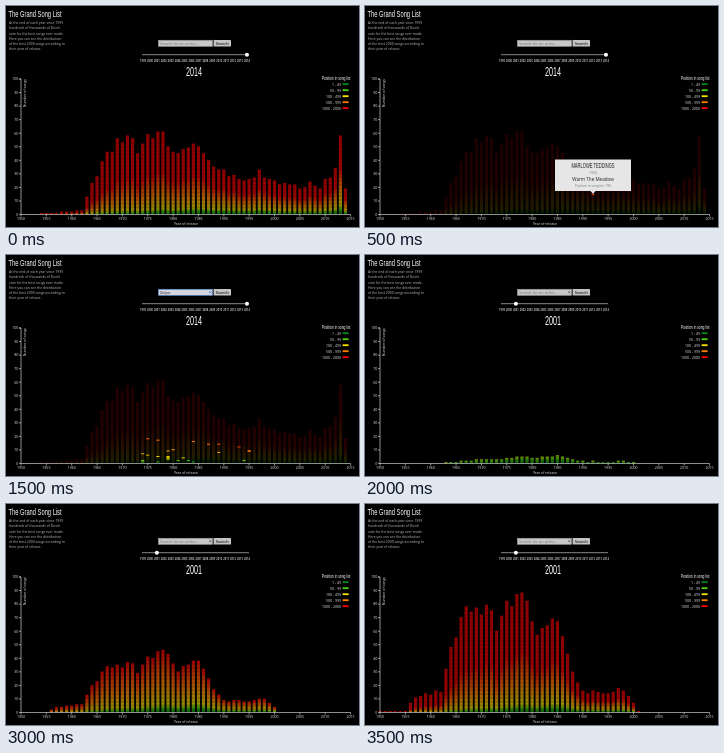
These frames come from a looping animation (353x221 px, 4000 ms). An HTML page with a canvas:

```html
<!DOCTYPE html>
<html lang="en">
<head>
<meta charset="utf-8">
<title>Songs by year of release</title>
<style>
  html, body { margin: 0; width: 100%; height: 100%; overflow: hidden; background: #000; }
  canvas, svg { position: absolute; left: 0; top: 0; width: 353px; height: 221px; display: block; }
  text { font: 3.5px "Open Sans", "Noto Sans", sans-serif; fill: #e6e6e6; }
  .narrow { font-family: "Liberation Sans", Roboto, sans-serif; fill: #fff; }
  .mid { text-anchor: middle; }
  .end { text-anchor: end; }
  .bold { font-weight: 600; }
  .soft { fill: #bbb; }
  .dark { fill: #222; }
  .grey { fill: #777; }
  .axis { stroke: #ccc; stroke-width: .7; fill: none; }
</style>
</head>
<body>
<canvas id="bars" width="353" height="221"></canvas>
<svg id="ui" viewBox="0 0 353 221"></svg>
<script>
const BASE = 208.3, SONG = 1.36, LOOP = 4000, HOLD = 500;
const yearX = year => 15 + (year - 1950) * 5.07;
const sliderX = year => 137 + (year - 1999) * 6.93;
const clamp = (v, lo, hi) => Math.min(hi, Math.max(lo, v));

function noise(n) {
  const v = Math.sin(n * 12.9898) * 43758.5453;
  return v - Math.floor(v);
}

// Value of a polyline through [x, y] points.
function along(points, x) {
  const i = clamp(points.findIndex(p => p[0] >= x), 1, points.length - 1);
  const [x0, y0] = points[i - 1], [x1, y1] = points[i];
  return y0 + (y1 - y0) * (x - x0) / (x1 - x0);
}

// Bar height trends in pixels; each year scatters around them.
const trend2014 = [[1950, 0], [1955, 1], [1962, 4], [1965, 42], [1969, 76], [1973, 67],
  [1978, 80], [1981, 60], [1985, 76], [1988, 44], [1993, 37], [1997, 42],
  [2001, 28], [2009, 29], [2012, 45], [2013, 72], [2014, 28]];
const trend2001 = [[1950, 1], [1955, 2], [1957, 15], [1962, 21], [1965, 81], [1968, 108],
  [1973, 90], [1979, 121], [1981, 76], [1985, 102], [1988, 38], [1990, 20], [1998, 23], [2001, 1]];

const barHeight = (trend, year) => along(trend, year) * (.88 + .24 * noise(year));

// Rank of the song at a share of its bar; later years hold better ranks.
const rankAt = (year, share) => 2000 * share ** clamp(.8 + (year - 1965) * .02, .5, 1.3);

const stops = [[0, [0, 128, 20]], [50, [70, 200, 20]], [120, [225, 215, 0]],
  [500, [255, 120, 0]], [1000, [235, 0, 0]], [2000, [220, 0, 0]]];

function rankColor(rank) {
  const channel = c => Math.round(along(stops.map(([r, rgb]) => [r, rgb[c]]), rank));
  return `rgb(${channel(0)},${channel(1)},${channel(2)})`;
}

const ctx = document.getElementById("bars").getContext("2d");

function drawBars({ trend, limit = 2000, alpha = 1, marks = [] }) {
  ctx.clearRect(0, 0, 353, 221);
  ctx.globalAlpha = alpha * .68;
  for (let year = 1950; year <= trend.at(-1)[0]; year++) {
    const height = barHeight(trend, year);
    for (let h = SONG / 2; h < height; h += SONG) {
      const rank = rankAt(year, h / height);
      if (rank > limit) break;
      ctx.fillStyle = rankColor(rank);
      ctx.fillRect(yearX(year) - 1.6, BASE - h - SONG / 2, 3.2, SONG);
    }
  }
  ctx.globalAlpha = 1;
  for (const [year, h] of marks) {
    ctx.fillStyle = rankColor(rankAt(year, Math.min(1, h / barHeight(trend, year))));
    ctx.fillRect(yearX(year) - 1.6, BASE - h - .5, 3.2, 1);
  }
}

const text = (x, y, str, size = 3.5, cls = "") =>
  `<text x="${x}" y="${y}" class="${cls}" style="font-size:${size}px">${str}</text>`;
const narrow = (x, y, str, size, cls = "", fill = "#fff") =>
  `<g transform="translate(${x} ${y}) scale(.6 1)">` +
  `<text class="narrow ${cls}" style="font-size:${size}px;fill:${fill}">${str}</text></g>`;
const repeat = (n, fn) => Array.from({ length: n }, (_, i) => fn(i)).join("");

const intro = ["At the end of each year since 1999", "hundreds of thousands of Dutch",
  "vote for the best songs ever made.", "Here you can see the distribution",
  "of the best 2000 songs according to", "their year of release."];
const groups = [["1 - 49", "#008a1c"], ["50 - 99", "#46d214"], ["100 - 499", "#f5e400"],
  ["500 - 999", "#ff8000"], ["1000 - 2000", "#f00"]];
const matches = ["Zelpo", "Zelpo &amp; Darro Finch", "Zelpos Of The Clay Hut", "Zelpostrëka"];

const page =
  narrow(2.5, 11, "The Grand Song List", 9.6) +
  intro.map((line, i) => text(3, 18.2 + i * 5.15, line, 3.4, "soft")).join("") +
  `<path class="axis" d="M13 73H15V208.5H344.6"/>` +
  repeat(11, i => {
    const y = 208.5 - i * 13.55;
    return `<path class="axis" d="M13 ${y}h2"/>` + text(12.3, y + 1.3, i * 10, 3.6, "end");
  }) +
  repeat(14, i => {
    const year = 1950 + i * 5, x = yearX(year);
    return `<path class="axis" d="M${x} 208.5v2"/>` + text(x, 213.8, year, 3.6, "mid");
  }) +
  text(180, 219.3, "Year of release", 3.5, "mid") +
  `<g transform="translate(20 73) rotate(-90)">${text(0, 0, "Number of songs", 3.5, "end")}</g>` +
  narrow(344.5, 73.6, "Position in song list", 5.6, "end") +
  groups.map(([label, color], i) => {
    const y = 78.2 + i * 6;
    return text(335, y + 1.3, label, 3.5, "end") +
      `<rect x="336.6" y="${y - .9}" width="6" height="1.8" fill="${color}"/>`;
  }).join("") +
  `<path d="M136 48.7H243" stroke="#aaa" stroke-width=".8"/>` +
  repeat(16, i => text(sliderX(1999 + i), 55.6, 1999 + i, 2.6, "mid bold")) +
  `<rect x="207.6" y="34" width="17.4" height="6.6" rx=".6" fill="#c4c4c4"/>` +
  text(216.3, 38.8, "Search", 4.1, "mid dark bold");

const tooltip =
  `<path d="M190 153.5H266V185H230.5L228 188L225.5 185H190Z" fill="#e6e6e6"/>` +
  narrow(228, 162, "MARLOWE TEDDINGS", 6.8, "mid", "#222") +
  text(228, 168, "1992", 3.5, "mid grey") +
  text(228, 175, "Warm The Meadow", 4.6, "mid dark") +
  text(228, 180.6, "Position in song list: 790", 3.2, "mid grey");

const dropdown =
  `<rect x="152.2" y="40.8" width="54.5" height="26" fill="#fff"/>` +
  matches.map((m, i) => text(179.5, 45.8 + i * 6.1, m, 4, "mid dark")).join("");

function searchBox(query, clear) {
  const [fill, edge, cross] = query ? ["#d6d6de", "#5b8fd6", "#2c62b8"] : ["#c8c8c8", "#999", "#444"];
  return `<rect x="152.5" y="34.3" width="54" height="6" fill="${fill}" stroke="${edge}" stroke-width=".7"/>` +
    text(154, 38.7, query || "Search for an artist...", 4, query ? "dark" : "grey") +
    (clear ? `<path d="M203.3 36.3l2 2m0-2l-2 2" stroke="${cross}" stroke-width=".7"/>` : "");
}

// One artist's songs: many in the seventies, fewer later, none above its bars.
const hits = Array.from({ length: 26 }, (_, i) => {
  const year = 1974 + Math.floor(22 * noise(i + 5) ** 1.7);
  return [year, SONG * (1 + Math.floor(noise(i + 60) * 22))];
});

const all2014 = { year: 2014, trend: trend2014 };
const search = { ...all2014, query: "Zelpo", clear: true };
// The chart for 2001 fills up group by group, best positions first.
const filling = [100, 500, 1000, 2000].map(limit =>
  ({ year: 2001, trend: trend2001, limit, clear: true }));
const scenes = [
  all2014,
  { ...all2014, alpha: .2, marks: [[1992, 19.7]], extra: tooltip },
  { ...search, extra: dropdown },
  { ...search, alpha: .22, marks: hits },
  ...filling];

const ui = document.getElementById("ui");
let current = -1;

function show(scene) {
  drawBars(scene);
  ui.innerHTML = page + searchBox(scene.query, scene.clear) +
    `<circle cx="${sliderX(scene.year)}" cy="48.7" r="2" fill="#fff"/>` +
    narrow(188, 70.3, scene.year, 12, "mid") + (scene.extra || "");
}

function tick() {
  const index = Math.floor(performance.now() % LOOP / HOLD);
  if (index !== current) show(scenes[current = index]);
  requestAnimationFrame(tick);
}
tick();
</script>
</body>
</html>
```
